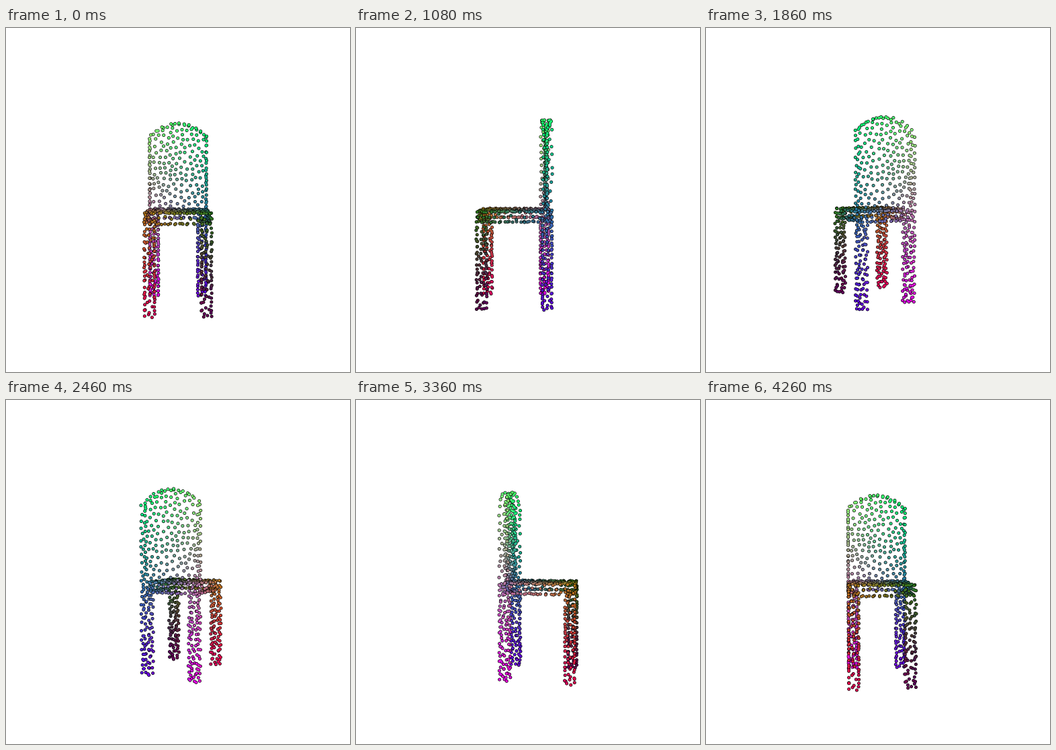
These frames come from a looping animation (512 by 512 pixels, 4320 ms). A matplotlib script:

```python
import numpy as np
import matplotlib.pyplot as plt
from matplotlib.animation import FuncAnimation

SIZE, DPI, FRAMES = 512, 64, 72
rng = np.random.default_rng(7)

# Chair dimensions in pixels at the turning axis; y points down.
W, BACK, FRONT, T = 44, -33, 71, 13
SEAT, APRON, FLOOR = 15, 29, 150.5
SHOULDER, ARCH = -97, 20


def patch(o, u, v, density=0.3):
    """Random points on the parallelogram at o spanned by u and v."""
    o, u, v = (np.array(a, float) for a in (o, u, v))
    n = int(np.linalg.norm(np.cross(u, v)) * density)
    return o + rng.random((n, 1)) * u + rng.random((n, 1)) * v


def tube(x, z, w, d, top, bottom):
    """Four upright walls around a rectangle."""
    h = (0, bottom - top, 0)
    return [
        patch((x, top, z), (w, 0, 0), h),
        patch((x, top, z + d), (w, 0, 0), h),
        patch((x, top, z), (0, 0, d), h),
        patch((x + w, top, z), (0, 0, d), h),
    ]


def arch(x):
    return SHOULDER - ARCH * (1 - (np.abs(x) / W) ** 2.1)


def chair():
    parts = []
    for x in (-W, W - T):
        for z in (BACK, FRONT - T):
            parts += tube(x, z, T, T, SEAT, FLOOR)
            parts.append(patch((x, FLOOR, z), (T, 0, 0), (0, 0, T)))

    depth = FRONT - BACK
    parts.append(patch((-W, SEAT, BACK), (2 * W, 0, 0), (0, 0, depth)))
    parts += tube(-W, BACK, 2 * W, depth, SEAT, APRON)
    for z in (BACK, FRONT - T):
        parts.append(patch((-W, APRON, z), (2 * W, 0, 0), (0, 0, T)))
    for x in (-W, W - T):
        parts.append(patch((x, APRON, BACK), (T, 0, 0), (0, 0, depth)))

    for x in (-W, W):
        parts.append(patch((x, SHOULDER, BACK), (0, SEAT - SHOULDER, 0), (0, 0, T)))
    rim = patch((-W, 0, BACK), (2 * W, 0, 0), (0, 0, T), 0.35)
    rim[:, 1] = arch(rim[:, 0])
    top = SHOULDER - ARCH
    sheet = patch((-W, top, BACK + T / 2), (2 * W, 0, 0), (0, SEAT - top, 0))
    parts += [rim, sheet[sheet[:, 1] > arch(sheet[:, 0])]]
    return np.vstack(parts)


def spread(points, n):
    """Farthest point sampling."""
    picked = [0]
    dist = np.full(len(points), np.inf)
    for _ in range(n - 1):
        dist = np.minimum(dist, ((points - points[picked[-1]]) ** 2).sum(1))
        picked.append(int(dist.argmax()))
    return points[picked]


pts = spread(chair(), 800)
px, py, pz = pts.T

right = (px + W) / (2 * W)
rear = (FRONT - pz) / (FRONT - BACK)
high = np.clip((FLOOR - py) / (FLOOR - SHOULDER + ARCH), 0, 1)
rgb = np.clip(np.column_stack([
    0.91 - 0.56 * right - 0.36 * high,
    1.04 * high ** 1.15,
    0.30 + 0.60 * rear - 0.42 * high,
]), 0, 1)

# Dark halos sit slightly behind their dots, so close dots merge.
N = len(pts)
colors = np.vstack([np.zeros((N, 3)), rgb])
radii = np.repeat([2.5, 1.85], N)
sizes = (2 * radii * 72 / DPI) ** 2
HALO_GAP = 9

CAM, TILT = 528, 0.038


def project(angle):
    c, s = np.cos(angle), np.sin(angle)
    x, z = px * c - pz * s, px * s + pz * c
    depth = CAM + py * TILT - z
    k = CAM / depth
    return np.column_stack([256 + k * x, 256 + k * (py + z * TILT)]), depth


fig = plt.figure(figsize=(SIZE / DPI, SIZE / DPI), dpi=DPI, facecolor="white")
ax = fig.add_axes([0, 0, 1, 1])
ax.set(xlim=(0, SIZE), ylim=(SIZE, 0))
ax.axis("off")
dots = ax.scatter(np.zeros(2 * N), np.zeros(2 * N), s=sizes, c=colors, linewidths=0)


def draw(i):
    xy, depth = project(2 * np.pi * i / FRAMES)
    order = np.argsort(-np.concatenate([depth + HALO_GAP, depth]), kind="stable")
    dots.set_offsets(np.vstack([xy, xy])[order])
    dots.set_facecolors(colors[order])
    dots.set_sizes(sizes[order], DPI)
    return (dots,)


anim = FuncAnimation(fig, draw, frames=FRAMES, interval=60, repeat=True,
                     repeat_delay=0, blit=False)
plt.show()
```
